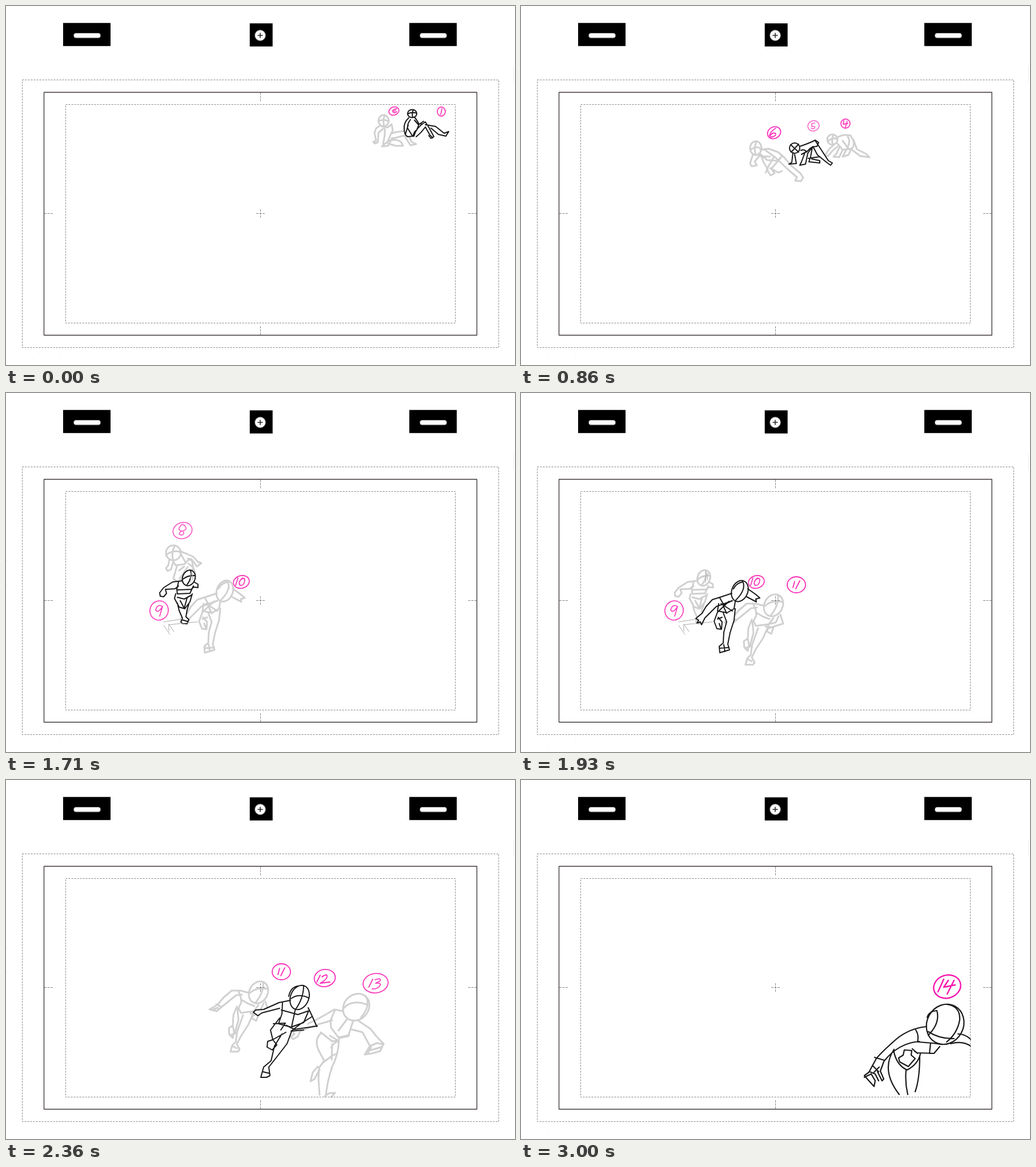
An HTML page with a canvas that plays this animation: 891x629 px, repeating every 5070 ms.

```html
<!DOCTYPE html>
<html lang="en">
<head>
<meta charset="utf-8">
<title>Rough run, onion skin</title>
<style>
html, body { margin: 0; height: 100%; overflow: hidden; background: #fff; }
canvas { display: block; }
</style>
</head>
<body>
<canvas width="891" height="629"></canvas>
<script>
const ctx = document.querySelector('canvas').getContext('2d');
const LOOP = 5070;
const STEPS = [210, 430, 640, 860, 1070, 1290, 1500, 1710, 1930, 2140, 2360, 2570, 2790, 3000];
const GREY = '#d0d0d0', INK = '#191919';
const poses = [];

function oval([x, y, rx, ry, tilt = 0]) {
  const path = new Path2D();
  path.ellipse(x, y, rx, ry, tilt * Math.PI / 180, 0, 7);
  return path;
}

// head and badge: [x, y, rx, ry, tilt]; lines and digits: path data
function pose(head, lines, badge, digits, pink = '#fb3fbb', soft = '') {
  poses.push({
    head: oval(head), lines: new Path2D(lines), badge: oval(badge),
    digits: new Path2D(digits), pink, soft: new Path2D(soft),
    ink: head[2] > 20 ? 2.2 : 2, ghost: 3
  });
}

pose([711, 188.5, 8, 7],
  `M703 189Q711 185 719 188M713 182Q710 188 712 195
   M705 196Q696 204 697 215Q697 226 703 229L713 228Q713 221 719 217L723 207Q719 199 715 195
   M708 199Q702 207 703 214L711 227M704 209L699 225M715 200L722 208L731 202M722 207L727 206
   M714 228Q718 213 734 203L741 214L749 229L744 232L740 227M718 229Q727 222 734 212L742 226L747 231
   M734 208L752 211L767 223L775 220L770 228L757 225L744 214`,
  [762, 185, 7, 8], 'M763 180L761 190');

pose([661, 201, 9, 10],
  `M652 202Q660 197 670 202M663 191Q659 201 662 211
   M656 209L648 214L645 222L648 236L643 238L645 241L651 239L652 222L660 215
   M658 211L668 213L675 207L677 218L673 226L668 238L661 243L658 246L669 245L676 231
   M663 215L663 226L660 242M676 223Q688 219 701 219L710 238L718 242L708 244L697 227L677 232
   M668 237Q684 231 692 239L695 245L682 245L669 241`,
  [679, 184, 9, 7, -20], 'M684 180Q676 181 677 185Q679 189 684 185M677 185L682 183');

pose([604, 217, 9, 9],
  `M596 219Q604 213 613 217M606 208Q602 217 605 226
   M612 214Q623 207 635 210L645 219Q648 231 640 239L625 242Q613 238 609 225
   M602 226L596 236L595 248L589 251L599 252L602 239L610 231
   M614 232L612 247L607 252L617 252L622 239M635 216L630 236L627 251L643 248L638 236
   M645 220L650 237L660 245L664 251L650 250L641 238`,
  [627, 194, 9, 8, -15], 'M624 190Q630 188 629 192Q626 194 628 194Q632 196 624 199');

pose([545, 234, 9, 9],
  `M537 237Q545 230 554 233M547 225Q543 235 546 243
   M553 231Q563 224 577 227L582 236Q584 248 578 250L563 252L554 241
   M549 242L540 250L533 260L529 263L537 263L545 254L554 246
   M558 246L552 259L547 264L557 265L563 252M572 229Q578 237 570 251L563 264L573 261L579 249
   M582 234L588 251L604 259L610 265L594 263L578 251M563 236L574 251`,
  [568, 206, 8, 8], 'M565 201L564 207L572 206M571 202L568 212');

pose([479, 249, 9, 9],
  `M472 243L486 256M486 242L473 256
   M488 246Q500 242 509 238L515 235L521 239L518 246Q507 246 502 254L491 260M490 253Q496 250 500 256
   M476 257L474 274L469 277L482 276L479 260M497 257L491 273L488 279L498 277L502 258L511 246
   M515 236L525 251L538 271L545 275L542 279L535 274L519 261L512 248M510 247L507 264L504 273L523 275L523 271L509 268M503 267L523 264`,
  [512, 210, 10, 9, -20], 'M514 205L509 206L509 211Q516 210 514 214Q511 216 508 214', '#fd75cf');

pose([411, 249, 10, 12],
  `M402 252Q411 244 421 250M412 237Q407 249 411 261
   M419 252L433 250L450 256L457 263L449 271L431 270L418 259
   M406 260L401 276L404 281L413 279L409 273L418 261M420 260L424 273L432 286L428 292M418 263L436 264
   M450 256Q462 265 471 278L489 293L494 301L490 307L480 306L483 300L468 287L447 267
   M442 266L430 286L437 297L444 293L438 285L454 267M436 284L451 292L457 289M427 252L446 266`,
  [443, 222, 12, 10, -30], 'M446 214Q437 219 435 227Q438 232 445 227Q448 221 440 223L436 227', '#fa34bc');

pose([351, 260, 12, 11],
  `M339 264Q351 255 363 260M354 249Q347 260 352 271
   M349 271L342 280L336 286L336 291L341 289L347 281L356 275
   M361 267L366 262L380 274L389 279L384 288M357 273L358 284L371 282L384 277M363 267L376 282
   M371 286L357 294L359 307L361 318L355 323L358 328L367 328L373 322L367 317L368 301L385 287
   M389 279L394 297L400 304L412 301L410 305L415 306L405 313L394 311L389 300L382 287
   M369 286L372 294L369 301L374 305L378 296`,
  [383, 227, 16, 10, -8], 'M376 222L390 222L378 231L387 231M380 227L389 226', '#f93abb');

pose([293, 280, 13, 13],
  `M280 284Q293 274 306 279M296 267Q288 280 293 294
   M286 292L284 302L280 307L283 312L289 309L292 298
   M304 277L317 282L328 287L336 296L342 298L334 304L328 295L318 290
   M292 294L297 302L312 300L322 290M306 282L315 298
   M299 304L293 325L299 330L310 336L306 347L298 351L302 355L313 353L317 341L304 325L318 305
   M319 299Q332 306 331 320L324 327L309 328M325 291L328 307L316 324M303 311L312 304`,
  [309, 241, 17, 14, -20], 'M304 235Q309 226 314 234Q318 240 308 242Q300 240 304 235M307 242Q299 248 308 249Q314 246 309 242', '#fc64c9');

pose([320, 324, 11, 14, 20],
  `M323 311Q327 323 316 337M310 326Q319 319 330 320
   M309 329L292 331L276 341L269 350L270 356L276 357L281 351L279 344L296 343L302 338
   M329 331L336 335L336 341L329 340L325 343M302 331L299 344L300 352L322 351L328 338M300 345L325 344
   M297 352L295 360L303 375L313 378L322 366L326 352M300 358L312 361L325 354M305 364L312 377L317 359
   M300 368L303 381L309 395L306 401L309 404L317 404L320 397L315 392L317 380L320 370M307 397L317 400`,
  [268, 381, 16, 17, 20], 'M274 374Q265 369 262 380Q266 387 274 374L269 391', '#fb46bf',
  'M276 401L309 396M285 406L335 401M276 407L287 423M285 405L294 418M285 406L285 417M324 314L323 332M327 316L326 328');

pose([383, 347, 14, 19, 22],
  `M388 330Q395 344 376 363M372 343Q377 333 388 331
   M369 351L351 357L335 362L324 374L317 386L306 395L311 398L308 403L314 401L316 406L322 394L342 374L370 364
   M397 343L411 353L418 359L411 361L412 366L395 357M346 369L344 382L361 385L373 378L375 365
   M350 369L370 382M364 365L344 384M348 359L355 371L369 364M354 373L360 386
   M344 384L338 400L343 413L351 414L352 401L345 393M344 396L352 393M347 404L350 413
   M375 378L373 398L366 420L362 440L365 450L348 455L347 444L354 438L355 419L360 401L354 385M348 447L364 446M355 441L357 453`,
  [412, 331, 14, 11, -15], 'M406 324L402 337M414 324Q405 332 410 337Q417 338 418 328Q418 322 411 327', '#f93aba');

pose([442, 372, 16, 20, 28],
  `M450 354Q452 372 436 391M427 373Q439 362 458 366
   M426 373L410 369L395 369L381 381L370 394L356 402L369 405L377 398L403 377L413 376M363 402L371 399M368 393L376 397
   M407 370L411 381L412 390L407 399L411 408L434 405L442 394M412 385L424 392L435 396
   M454 388L459 404L443 409L431 413M451 391L446 402L433 405L431 418L438 422L442 411M428 409L441 411
   M404 397L398 412L397 430L390 435L391 446L397 452L399 441L397 430M405 400L407 420L401 442M393 447L404 443
   M433 408L424 429L411 449L404 463L409 472L406 476L393 476L396 465L402 459L405 440L415 412M396 466L404 470`,
  [482, 336, 16, 14], 'M479 330L476 341M488 329L481 343', '#f82eb9');

pose([514, 381, 16, 22, 22],
  `M521 360Q521 383 506 403M499 383Q513 373 530 382M495 379Q498 363 511 361
   M498 386L478 390L451 402L437 403L433 407L441 413L448 408L479 400
   M484 390L483 410L477 427L499 433L521 425L530 404M482 403L511 411L528 405M506 404L500 432
   M529 399L537 416L544 432M535 415L516 427L499 440L521 438M491 430L505 437L545 431
   M479 417L463 438L467 455L458 458L457 468L466 473L474 464L467 455L490 442M468 427L489 426L481 438
   M500 440L492 462L475 484L460 503L462 518L456 521L446 521L451 503L464 492L470 466L483 445M449 511L461 514`,
  [558, 347, 18.5, 15, -10], 'M550 342L544 354M553 345Q563 338 562 345Q560 351 550 356L567 354', '#f82ab9');

pose([613, 398, 21.5, 25, 42],
  `M590 401Q605 383 633 394M629 378Q640 394 621 417
   M590 405L575 402Q558 412 545 419L510 436L498 441L498 450L503 454L511 449L515 440L547 428L571 421
   M501 440L505 445L499 450M576 403L568 421L569 434L582 451L601 447M597 419L582 439M608 421L599 449L584 452
   M617 422L638 436L650 451L661 462L655 475L641 479L628 481L637 466L624 442L605 437
   M637 466L649 461L661 463M639 468L633 479M636 474L657 468
   M551 442L571 458L583 456L574 462L569 469M552 443Q538 455 548 475L557 492L548 504L547 525L549 552
   M583 453Q582 482 571 502Q562 529 560 553M555 495L571 483L580 479M567 448L582 457M571 463L570 490
   M546 502L537 512L533 528L540 524L549 507M558 554L565 549L576 548L569 556`,
  [647, 356, 22, 17, -8], 'M642 349L635 363M646 350Q657 346 655 352L647 356Q657 355 655 360Q650 367 641 366', '#f93cbd');

pose([742.5, 428, 32, 36, 28],
  `M711 416Q714 405 728 404Q734 426 713 447M745 393Q769 396 768 420Q764 444 745 459M713 441Q733 454 758 453
   M710 432Q680 435 657 454Q632 476 622 488M697 458Q661 461 636 492M691 438Q697 447 694 459
   M619 486L636 491L629 510L635 524L632 527L624 511M622 488L609 512L601 518L618 537L620 527L613 515L601 521
   M618 512L627 503M610 511L620 515L626 527M615 500L626 511
   M696 459L720 461L735 463M717 461L715 479M689 475L693 478L723 479L733 467M685 471L694 479
   M652 473Q657 500 676 508Q695 498 699 480M661 487L669 482L671 473L684 474L683 482L690 488L678 502L663 494Z
   M653 472Q629 508 662 551M674 509Q672 530 677 551M698 483Q698 524 690 546
   M765 445Q778 445 788 455M752 462Q774 456 788 467`,
  [746, 362, 24, 20, -18], 'M740 349L730 371M748 351L740 363L760 359M758 351L746 375', '#f615ad');

function strokePose(p, color, width) {
  ctx.strokeStyle = color;
  ctx.lineWidth = width;
  ctx.stroke(p.head);
  ctx.stroke(p.lines);
  ctx.strokeStyle = '#aaa';
  ctx.lineWidth = 1;
  ctx.stroke(p.soft);
}

function drawBadge(p) {
  ctx.strokeStyle = p.pink;
  ctx.lineWidth = p === poses[13] ? 2.4 : 1.8;
  ctx.stroke(p.badge);
  ctx.stroke(p.digits);
}

function pegHole(x, y, w, h, r) {
  ctx.beginPath();
  ctx.roundRect(x, y, w, h, r);
  ctx.fillStyle = '#fff';
  ctx.strokeStyle = '#666';
  ctx.lineWidth = 2;
  ctx.stroke();
  ctx.fill();
}

function drawSheet() {
  ctx.fillStyle = '#000';
  for (const [x, y, w] of [[100, 29.7, 83], [426.7, 30.4, 40], [706, 29.7, 83]]) ctx.fillRect(x, y, w, 40.5);
  pegHole(119, 48, 46, 7.5, 3.5);
  pegHole(725, 48, 46, 7.5, 3.5);
  pegHole(436, 42.5, 18, 18, 9);
  ctx.strokeStyle = '#222';
  ctx.lineWidth = 1.5;
  ctx.stroke(new Path2D('M441 51.5H449M445 47.5V55.5'));

  ctx.strokeStyle = '#433b40';
  ctx.lineWidth = 1.4;
  ctx.strokeRect(66.5, 151.2, 757.8, 425.5);
  ctx.lineCap = 'butt';
  ctx.lineWidth = 1;
  ctx.strokeStyle = '#858585';
  ctx.setLineDash([3, 2]);
  ctx.strokeRect(28.5, 129.5, 834, 469);
  ctx.strokeRect(104.5, 172.5, 682, 383);
  ctx.setLineDash([4, 1.5]);
  ctx.stroke(new Path2D('M445.5 152V167M445.5 561V576M67 363.5H82M809 363.5H824M438 363.5H453M445.5 356V371'));
  ctx.setLineDash([]);
  ctx.lineCap = 'round';

  ctx.fillStyle = '#ddd';
  for (const [x, y] of [[2, 293], [2, 337], [48, 618], [95, 609]]) ctx.fillRect(x, y, 1, 1);
  ctx.fillStyle = '#eee';
  ctx.fillRect(888, 105, 1, 30);
}

function draw(now) {
  const t = now % LOOP;
  const step = STEPS.filter(s => t >= s).length;
  const index = Math.min(step, poses.length - 1);
  const current = poses[index];
  const ghosts = step > index ? [] : [poses[index - 1], poses[index + 1]].filter(Boolean);

  ctx.fillStyle = '#fff';
  ctx.fillRect(0, 0, 891, 629);
  ctx.lineCap = ctx.lineJoin = 'round';
  ctx.save();
  ctx.beginPath();
  ctx.rect(0, 0, 787.5, 556.5);
  ctx.clip();
  for (const p of ghosts) strokePose(p, GREY, p.ghost);
  ctx.fillStyle = '#fff';
  ctx.fill(current.head);
  ctx.fill(current.lines);
  strokePose(current, INK, current.ink);
  [...ghosts, current].forEach(drawBadge);
  ctx.restore();
  drawSheet();
  requestAnimationFrame(draw);
}
requestAnimationFrame(draw);
</script>
</body>
</html>
```
